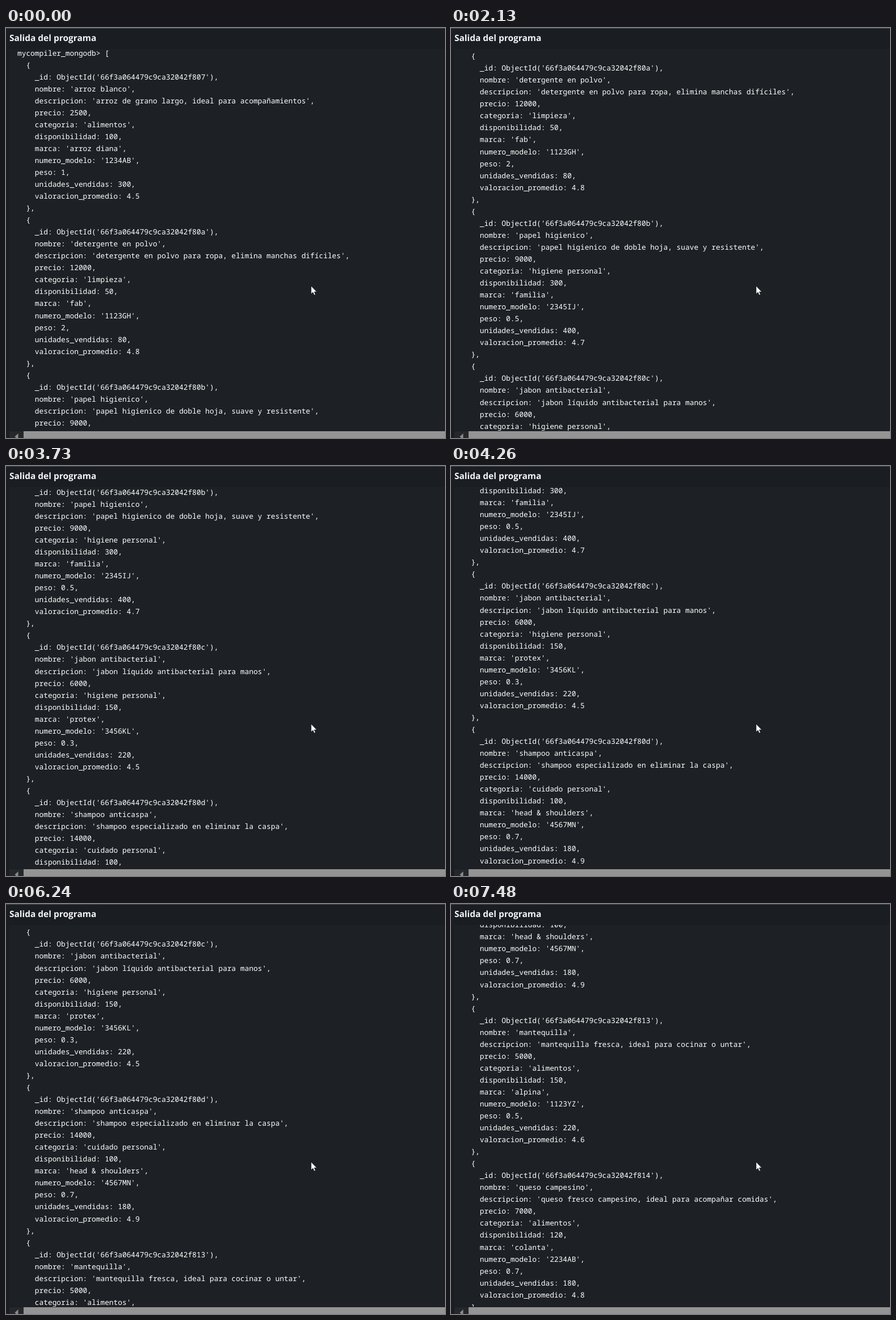
An HTML page for the animation above (8000 ms loop, 774 by 723 pixels).

```html
<!DOCTYPE html>
<html lang="es">
<head>
<meta charset="utf-8">
<title>Salida del programa</title>
<style>
  html, body { margin: 0; width: 100%; height: 100%; overflow: hidden; background: #1a1d21; }
  #stage { position: relative; width: 774px; height: 723px; overflow: hidden; background: #1a1d21;
    text-rendering: geometricPrecision; }
  #stage > * { position: absolute; margin: 0; }
  .edge { left: 0; top: 0; width: 100%; height: 1px; background: #4a4d50; }
  h1 { left: 6px; top: 6px; font: 700 15.45px/22px "Open Sans", "Noto Sans", sans-serif; color: #f4f6f8; white-space: nowrap; }
  .panel { left: 6px; top: 37px; width: 768px; height: 673px; overflow: hidden; background: #1d2125; }
  pre { position: absolute; margin: 0; left: 14px; top: -3.5px; color: #fff;
    font: 500 12.85px/21.05px "Noto Sans Mono", "DejaVu Sans Mono", monospace; font-variant-ligatures: none; }
  .bar { left: 6px; top: 711px; width: 768px; height: 12px; background: #24282b; }
  .thumb { left: 31px; top: 711px; width: 743px; height: 12px; background: #949494; }
  svg { left: 0; top: 0; }
</style>
</head>
<body>
<div id="stage">
  <div class="edge"></div>
  <h1>Salida del programa</h1>
  <div class="panel"><pre id="out"></pre></div>
  <div class="bar"></div>
  <div class="thumb"></div>
  <svg width="774" height="723">
    <path d="M21.5 715V723H18L15.5 720.5Z" fill="#8b8b8b"/>
    <path d="M538 455V469L541.2 466L543.4 471L545.6 470L543.5 465.2H547.8Z" fill="#fff" stroke="#0b0c0e" stroke-width=".6"/>
  </svg>
</div>
<script>
const keys = ['nombre', 'descripcion', 'precio', 'categoria', 'disponibilidad', 'marca',
  'numero_modelo', 'peso', 'unidades_vendidas', 'valoracion_promedio'];
const items = [
  ['07', 'arroz blanco', 'arroz de grano largo, ideal para acompañamientos', 2500, 'alimentos', 100, 'arroz diana', '1234AB', 1, 300, 4.5],
  ['0a', 'detergente en polvo', 'detergente en polvo para ropa, elimina manchas difíciles', 12000, 'limpieza', 50, 'fab', '1123GH', 2, 80, 4.8],
  ['0b', 'papel higienico', 'papel higienico de doble hoja, suave y resistente', 9000, 'higiene personal', 300, 'familia', '2345IJ', 0.5, 400, 4.7],
  ['0c', 'jabon antibacterial', 'jabon líquido antibacterial para manos', 6000, 'higiene personal', 150, 'protex', '3456KL', 0.3, 220, 4.5],
  ['0d', 'shampoo anticaspa', 'shampoo especializado en eliminar la caspa', 14000, 'cuidado personal', 100, 'head & shoulders', '4567MN', 0.7, 180, 4.9],
  ['13', 'mantequilla', 'mantequilla fresca, ideal para cocinar o untar', 5000, 'alimentos', 150, 'alpina', '1123YZ', 0.5, 220, 4.6],
  ['14', 'queso campesino', 'queso fresco campesino, ideal para acompañar comidas', 7000, 'alimentos', 120, 'colanta', '2234AB', 0.7, 180, 4.8]
];

const quote = v => typeof v === 'string' ? `'${v}'` : v;
const record = ([id, ...vals]) => {
  const fields = [`_id: ObjectId('66f3a064479c9ca32042f8${id}')`,
    ...vals.map((v, i) => `${keys[i]}: ${quote(v)}`)];
  return `  {\n    ${fields.join(',\n    ')}\n  },`;
};
const out = document.getElementById('out');
out.textContent = 'mycompiler_mongodb> [\n' + items.map(record).join('\n');

// Momentum scrolls, shown in discrete steps that slow down towards the end
const LOOP = 8000;
const scrolls = [
  { from: 0, to: 297, pow: 1.445,
    at: [840, 970, 1100, 1230, 1350, 1480, 1630, 1760, 1880, 2010, 2130, 2280] },
  { from: 297, to: 753, pow: 2.32,
    at: [3070, 3200, 3330, 3450, 3580, 3730, 3850, 4000, 4130, 4260, 4420, 4550, 4700, 4830, 4960, 5100, 5220] },
  { from: 753, to: 1148, pow: 1.3, at: [6120, 6250, 6380, 6500, 6650, 6780] },
  { from: 1148, to: 1249, pow: 1.5, at: [6930, 7070, 7220, 7350, 7480] }
];

function offset(t) {
  let y = 0;
  for (const { from, to, pow, at } of scrolls) {
    const done = at.filter(ms => ms <= t).length;
    if (done) y = to - (to - from) * (1 - done / at.length) ** pow;
  }
  return Math.round(y);
}

const start = performance.now();
function draw() {
  const t = (performance.now() - start) % LOOP;
  out.style.transform = `translateY(${-offset(t)}px)`;
  requestAnimationFrame(draw);
}
draw();
</script>
</body>
</html>
```
